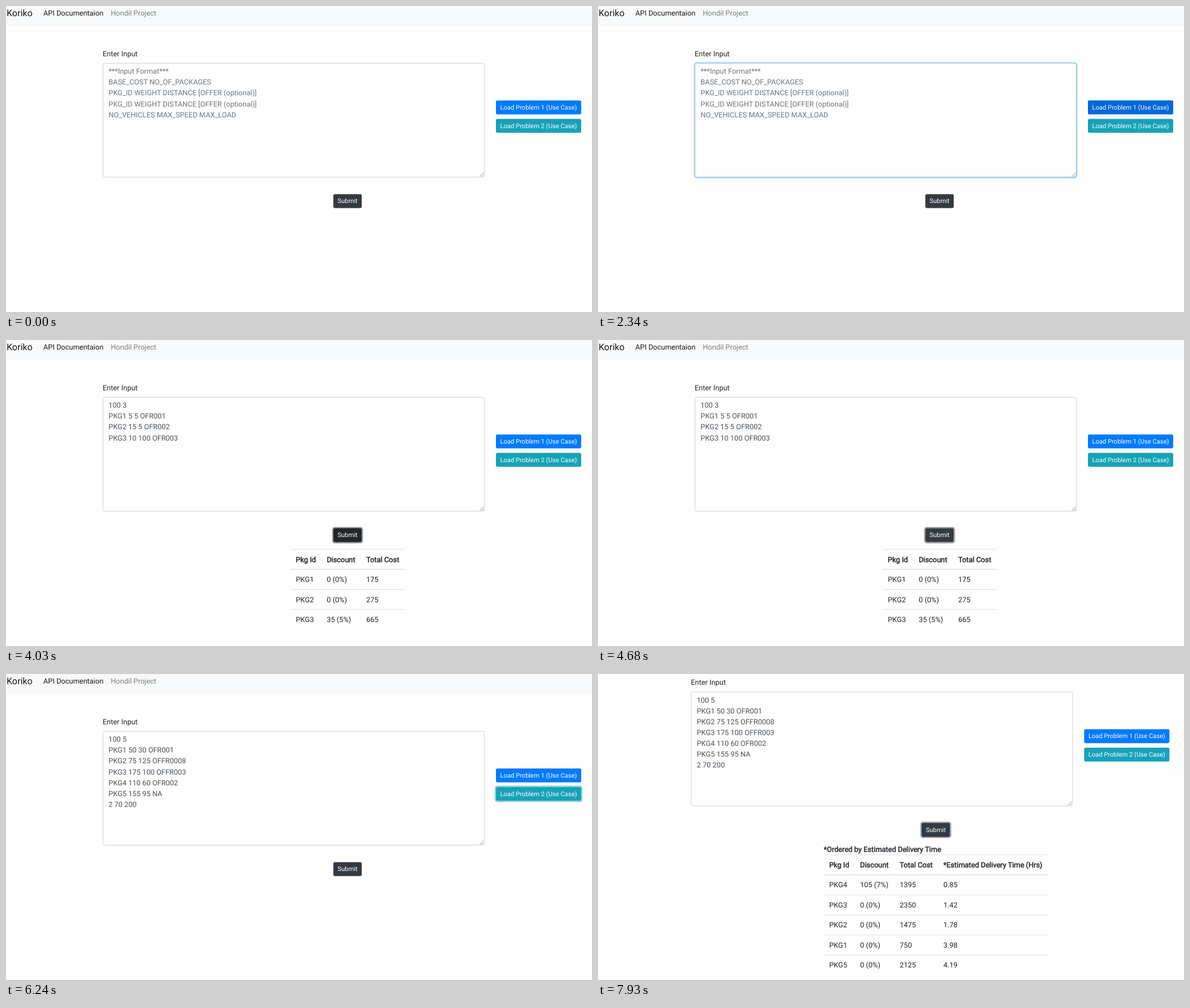
Recreate the animation shown at these times as an HTML page. Size 976 px wide and 511 px high, loop 8 s.

```html
<!DOCTYPE html>
<html lang="en">
<head>
<meta charset="utf-8">
<title>Package cost form</title>
<style>
  html, body { margin: 0; width: 100%; height: 100%; overflow: hidden; background: #fefefe; }
  svg { display: block; width: 976px; height: 511px; }
  text { font: 12.07px Roboto, sans-serif; fill: #212529; text-rendering: geometricPrecision; white-space: pre; }
  .brand { font-size: 15.2px; fill: #18191a; }
  .active { fill: #18191a; }
  .muted { fill: #7c7d7d; }
  .hint text { fill: #6c757d; }
  .value text { fill: #495057; }
  .btn text { font-size: 10.56px; fill: #fff; }
  .bold { stroke: #212529; stroke-width: .45px; }
</style>
</head>
<body>
<svg viewBox="0 0 976 511" id="stage"></svg>
<script>
const LOOP = 8000, STEP = 130, FADE = 150;
const SHIFT = -6.3, SCROLL = -65.6, ROW = 33.5;

const label = (x, y, s, cls = '') => `<text x="${x}" y="${y}" class="${cls}">${s}</text>`;
const box = (x, y, w, h, r, attrs) =>
  `<rect x="${x}" y="${y}" width="${w}" height="${h}" rx="${r}" ${attrs}/>`;

const lines = (id, cls, rows) =>
  `<g id="${id}" class="${cls}">${rows.map((s, i) => label(170.8, 113.2 + 18.1 * i, s)).join('')}</g>`;

const button = (id, x, y, w, s, base, dark, ring) => `<g class="btn">
  ${box(x, y, w, 23.3, 2.4, `fill="${base}"`)}
  ${box(x, y, w, 23.3, 2.4, `id="${id}Dark" fill="${dark}"`)}
  ${box(x - 1.1, y - 1.1, w + 2.2, 25.5, 3.3, `id="${id}Ring" fill="none" stroke="${ring}" stroke-opacity=".5" stroke-width="2.2"`)}
  ${label(x + 7, y + 15.2, s)}</g>`;

function table(id, x, y, w, cols, rows) {
  let out = '';
  rows.forEach((row, r) => {
    const top = y + ROW * r, thick = r === 1 ? 1.5 : 1;
    out += box(x, top - thick / 2, w, thick, 0, 'fill="#dee2e6"');
    row.split('|').forEach((s, c) => out += label(cols[c], top + 21.1, s, r ? '' : 'bold'));
  });
  return `<g id="${id}">${out}</g>`;
}

stage.innerHTML = `<g id="page">
  ${box(-10, 0, 1000, 33, 0, 'fill="#f8f9fa"')}
  ${label(1, 17, 'Koriko', 'brand')}
  ${label(62.2, 16.2, 'API Documentaion', 'active')}
  ${label(174.5, 16.2, 'Hondil Project', 'muted')}
  <g id="main">
    ${label(161, 84.1, 'Enter Input')}
    ${box(161.5, 95.5, 635.2, 190.4, 3, 'fill="#fefefe" stroke="#ced4da"')}
    <g id="focus">
      ${box(160.4, 94.4, 637.4, 192.6, 4, 'fill="none" stroke="#007bff" stroke-opacity=".25" stroke-width="1.8"')}
      ${box(161.5, 95.5, 635.2, 190.4, 3, 'fill="none" stroke="#80bdff" stroke-width=".8"')}
    </g>
    <path d="M789 285l6.5-6.5M793 285l2.5-2.5" stroke="#777" stroke-width=".8"/>
    ${lines('hint', 'hint', ['***Input Format***', 'BASE_COST NO_OF_PACKAGES',
      'PKG_ID WEIGHT DISTANCE [OFFER (optional)]', 'PKG_ID WEIGHT DISTANCE [OFFER (optional)]',
      'NO_VEHICLES MAX_SPEED MAX_LOAD'])}
    ${lines('input1', 'value', ['100 3', 'PKG1 5 5 OFR001', 'PKG2 15 5 OFR002', 'PKG3 10 100 OFR003'])}
    ${lines('input2', 'value', ['100 5', 'PKG1 50 30 OFR001', 'PKG2 75 125 OFFR0008',
      'PKG3 175 100 OFFR003', 'PKG4 110 60 OFR002', 'PKG5 155 95 NA', '2 70 200'])}
    ${button('load1', 816, 157.8, 142, 'Load Problem 1 (Use Case)', '#007bff', '#0069d9', '#268fff')}
    ${button('load2', 816, 188.5, 142, 'Load Problem 2 (Use Case)', '#17a2b8', '#117a8b', '#3ab0c3')}
    ${button('submit', 545.2, 314.2, 47.3, 'Submit', '#343a40', '#23272b', '#52585d')}
    ${table('result1', 473.5, 349.5, 190.5, [482.7, 534.2, 600],
      ['Pkg Id|Discount|Total Cost', 'PKG1|0 (0%)|175', 'PKG2|0 (0%)|275', 'PKG3|35 (5%)|665'])}
    <g id="ordered">
      ${label(382.3, 362.3, '*Ordered by Estimated Delivery Time', 'bold')}
      ${table('result2', 382.3, 367.5, 373.6, [391.3, 442.8, 508.8, 581.6],
        ['Pkg Id|Discount|Total Cost|*Estimated Delivery Time (Hrs)',
         'PKG4|105 (7%)|1395|0.85', 'PKG3|0 (0%)|2350|1.42', 'PKG2|0 (0%)|1475|1.78',
         'PKG1|0 (0%)|750|3.98', 'PKG5|0 (0%)|2125|4.19'])}
    </g>
  </g>
</g>`;

const el = id => document.getElementById(id);
const fade = (id, v) => el(id).setAttribute('opacity', v);
const move = (id, x, y) => el(id).setAttribute('transform', `translate(${x} ${y})`);

function draw(now) {
  const t = Math.floor((now % LOOP) / STEP) * STEP;
  const ramp = at => Math.min(1, Math.max(0, (t - at) / FADE));
  const during = (a, b) => ramp(a) - ramp(b);
  const show = (id, a, b) => fade(id, t >= a && t < b ? 1 : 0);

  fade('focus', during(970, 2400));
  fade('load1Dark', during(2010, 2790));
  fade('load1Ring', during(2400, 3570));
  fade('load2Dark', .75 * during(5000, 6040) + .25 * during(5460, 5650));
  fade('load2Ring', during(5520, 6690));
  fade('submitDark', during(3310, 4350) + during(6430, 7470));
  fade('submitRing', during(3570, 5520) + ramp(6690));

  show('hint', 0, 2600);
  show('input1', 2600, 5720);
  show('input2', 5720, LOOP);
  show('result1', 3770, 5720);
  show('ordered', 6890, LOOP);
  move('main', t >= 6890 ? SHIFT : 0, 0);
  move('page', 0, t >= 7930 ? SCROLL : 0);
}

function tick() {
  draw(performance.now());
  requestAnimationFrame(tick);
}
tick();
</script>
</body>
</html>
```
